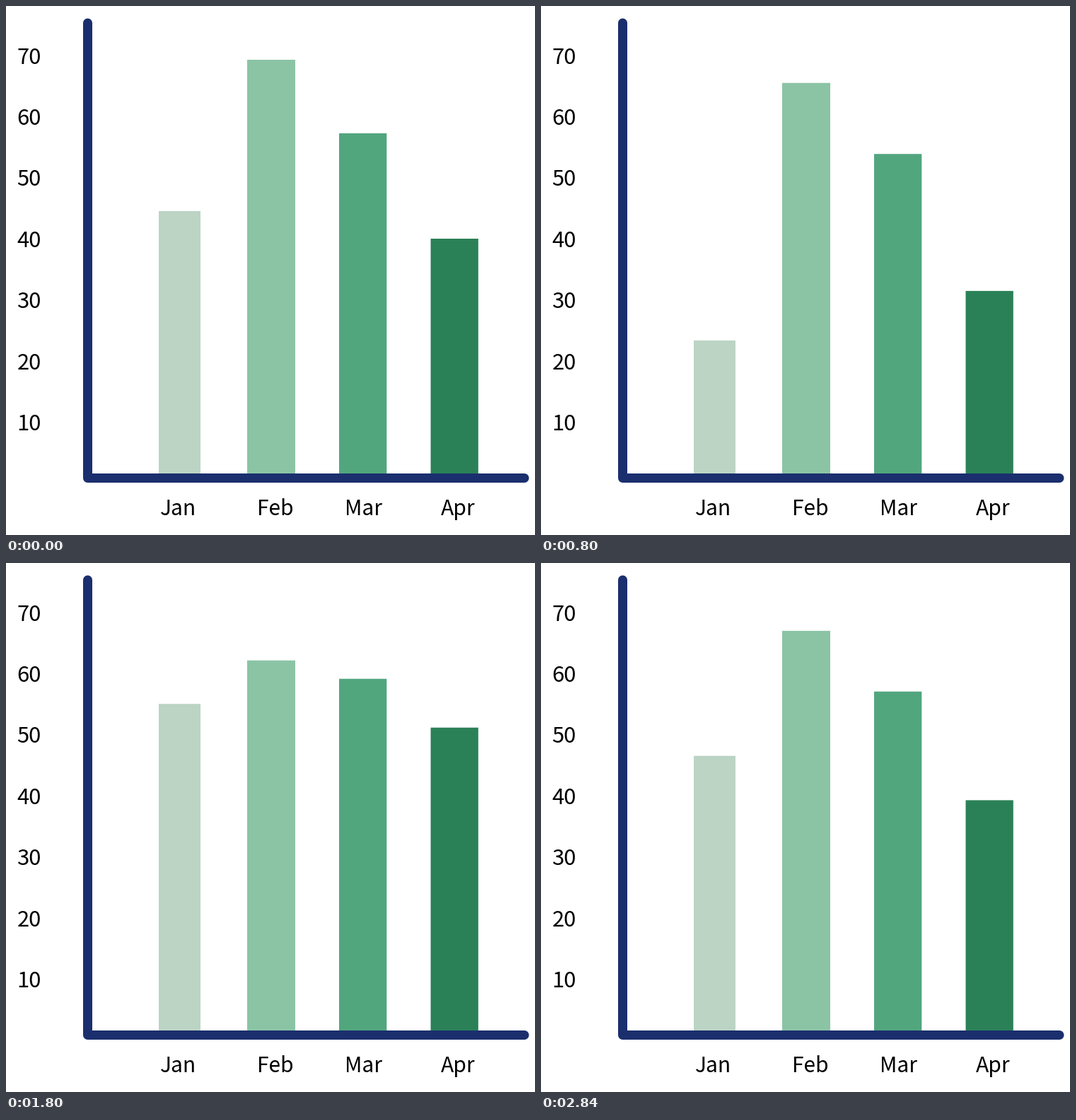
A matplotlib script that plays this animation: 748 by 748 pixels, repeating every 2.88 s.

```python
import numpy as np
import matplotlib.pyplot as plt
from matplotlib.animation import FuncAnimation
from matplotlib.patches import Rectangle

SIZE, DPI = 748, 100
FRAMES, STEP = 72, 40
BEATS = 7
PT = 72 / DPI
BASE = 664
NAVY = "#1b2f6e"

# label, label centre, left edge, width, colour, top edge on each beat
BARS = [
    ("Jan", 243.5, 216, 59, "#bbd4c4", [290, 149, 492, 200, 269, 83, 112]),
    ("Feb", 381, 341, 68, "#8bc4a5", [76, 343, 95, 320, 164, 94, 281]),
    ("Mar", 505.3, 471, 67.3, "#52a67e", [180, 77, 217, 233, 100, 270, 198]),
    ("Apr", 639.3, 600.5, 67.3, "#2a8157", [329, 333, 407, 48, 127, 409, 395]),
]

fig = plt.figure(figsize=(SIZE / DPI, SIZE / DPI), dpi=DPI, facecolor="white")
ax = fig.add_axes([0, 0, 1, 1])
ax.set_xlim(0, SIZE)
ax.set_ylim(SIZE, 0)
ax.axis("off")


def label(x, y, text, size):
    ax.text(x, y, text, family="Noto Sans CJK JP", fontsize=size * PT,
            color="black", ha="center", va="baseline")


def bar_top(frame, tops):
    """Straight runs between evenly spaced beats, closing into a loop."""
    return np.interp(frame * BEATS / FRAMES, range(BEATS), tops, period=BEATS)


for i in range(7):
    label(32.6, 81.5 + 86.4 * i, str(70 - 10 * i), 31)

rects = []
for name, cx, left, width, colour, tops in BARS:
    label(cx, 720, name, 30)
    rect = Rectangle((left, BASE), width, 0, facecolor=colour,
                     linewidth=0, snap=False, zorder=1)
    rects.append(ax.add_patch(rect))

ax.plot([115.5, 115.5, 733], [24, 667.5, 667.5], color=NAVY,
        linewidth=13 * PT, snap=False, solid_capstyle="round",
        solid_joinstyle="round", zorder=2)


def draw(frame):
    for rect, bar in zip(rects, BARS):
        top = bar_top(frame, bar[-1])
        rect.set_y(top)
        rect.set_height(BASE - top)
    return rects


anim = FuncAnimation(fig, draw, frames=FRAMES, interval=STEP,
                     repeat=True, repeat_delay=0, blit=False)
plt.show()
```
